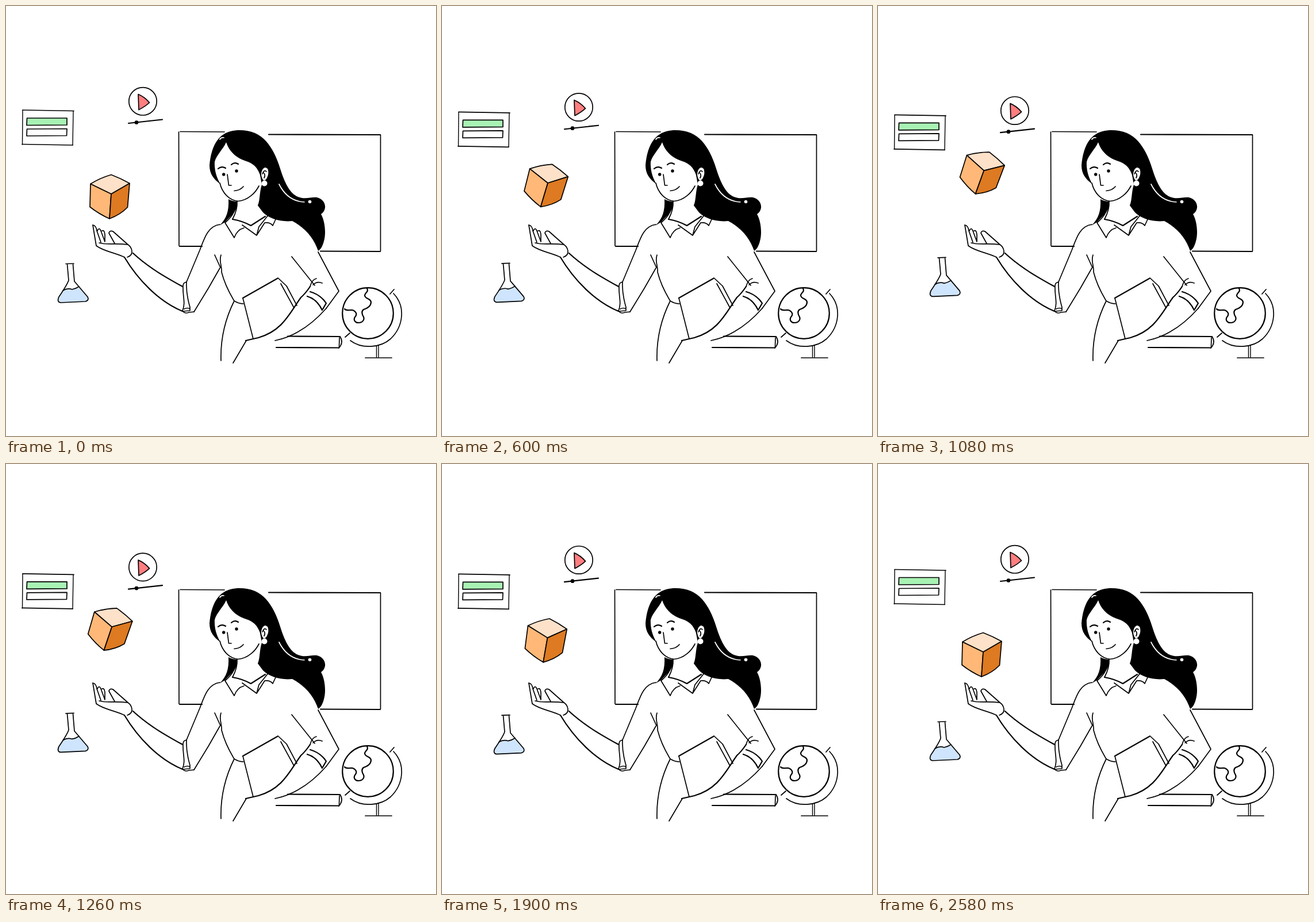
An HTML page for the animation above (2.6 s loop, 748x748 px).

```html
<!DOCTYPE html>
<html lang="en">
<head>
<meta charset="utf-8">
<title>Teacher</title>
<style>
  html, body { margin: 0; width: 100%; height: 100%; overflow: hidden; background: #fff; }
  svg { display: block; width: 100vw; height: 100vh; }
  .ink { fill: none; stroke: #000; stroke-width: 1.7; stroke-linecap: round; stroke-linejoin: round; }
  .bold { stroke-width: 2.2; }
  .thin { stroke-width: 1.4; }
  .black { fill: #000; }
  .glint { stroke: #fff; }
</style>
</head>
<body>
<svg viewBox="0 0 748 748">
  <!-- board -->
  <g class="ink">
    <path d="M303 218.500L380 219M300.500 219L301 417M651.500 224V426"/>
    <path class="bold" d="M457 223.500L651 224M302 418L341 418M547 426.500L651 427"/>
  </g>

  <!-- desk book and globe -->
  <g class="ink">
    <path class="bold" d="M490 574.500L581 575M470 594L579 594.500"/>
    <path d="M581 575Q588 585 579 595M580 577L579.500 593"/>
    <circle class="bold" cx="629.500" cy="534.500" r="44.300"/>
    <path d="M674 500C696 523 691 558 669 579C651 595 619 597 599 582"/>
    <path d="M668 501L675 493M590 576L598 569M625 612H671"/>
    <path class="thin" d="M644.500 591V611M648 590V611"/>
    <path class="bold" d="M589 527C592 531 598 528 603 529C610 532 611 537 607 541C604 546 607 551 613 551C620 551 624 546 622 541C619 536 618 531 622 528C628 526 635 522 635 515C634 508 624 510 624 503C625 498 631 498 628 491"/>
  </g>

  <!-- hair -->
  <path class="black" d="M383 237C378 249 366 259 363 271C362 288 368 301 373 310C361 301 354 292 354 277C356 252 364 232 379 223C392 214 416 214 433 221C456 231 469 257 477 283C484 305 493 326 508 332C520 337 530 332 541 333C550 335 556 343 555 351C554 357 551 360 548 362C555 374 557 396 553 409C551 417 548 423 543 426C536 405 521 386 498 374C477 376 458 370 447 359L438 347C442 338 441 322 445 311L442 294C437 280 430 274 418 270C399 264 388 252 383 237Z"/>
  <path class="black" d="M387 336C388 356 384 370 371 382L381 376L397 359L402 350V340Q394 340 387 336Z"/>
  <path class="ink glint" d="M372 232Q374 228 379 229M475 310C484 328 498 340 519 341"/>
  <circle cx="528.500" cy="340.500" r="2.800" fill="#fff"/>

  <!-- face -->
  <g class="ink">
    <path d="M372 308C376 325 388 338 404 339.500C421 338 434 325 440 313"/>
    <path class="bold" d="M369 283Q375 278 382 282M392 276Q398 271 404 275"/>
    <path d="M385 293L387.500 312L392 312M397 321.500Q407 321 413 314"/>
    <path fill="#fff" d="M443 293C444 281 451 277 456 283C459 291 456 300 451 304Q445 306 443 293Z"/>
    <path d="M446 292Q449 284 453 288M448 290Q452 294 449 299"/>
    <circle cx="449.500" cy="308.500" r="5" fill="#fff" stroke="none"/>
  </g>
  <circle class="black" cx="378.700" cy="293" r="2.700"/>
  <circle class="black" cx="401" cy="287" r="2.700"/>

  <!-- shirt -->
  <g class="ink">
    <path d="M402 340Q403 354 394 371M396 359C393 366 387 372 381 377L397 403Q402 389 414 386"/>
    <path class="bold" d="M394 371C406 373 417 377 426 382L451 366"/>
    <path d="M411 381L436 399L440 384M436 399L450 377Q460 376 464 382L470 369M440 384L456 364"/>
    <path d="M372 380C351 383 345 404 337 425L314 480M363 433L373 455M374 433C370 445 376 452 375 463C380 482 389 500 397 513"/>
    <path d="M372 456L352 491L327 532M397 513Q405 518 413 518M397 513C378 551 373 585 374 617"/>
    <path d="M314 480Q308 481 308 487C307 505 313 516 307 530Q311 536 318 533L327 532M314 480Q313 500 320 524V530L308 531M310 527Q316 524 320 527"/>
    <path d="M543 428L579 496L557 526M497 436L537 486M529 488Q532 476 540 474M534 485Q541 478 550 482"/>
    <path class="bold" d="M529 497Q547 502 557 517L550 529M524 505Q541 510 550 529"/>
  </g>

  <!-- hands and held book -->
  <g class="ink">
    <path class="bold" d="M221 430C249 456 280 473 307 488M206 437C230 477 266 514 307 531"/>
    <path d="M151 381L157 417C170 427 190 429 206 437M211 437Q220 434 219 426Q218 419 212 415L186 392Q180 390 179 395L189 413"/>
    <path d="M151 381Q157 382 158 391L165 411M159 391Q162 384 165 391L172 410M167 391Q171 389 172 397V409M162 412C175 416 190 412 212 415"/>
    <path class="bold" d="M412 508L472 474"/>
    <path d="M412 508L430 579M473 473L488 487L506 521M478 483L501 525"/>
    <path class="bold" d="M417 582L439 577C481 565 493 535 513 507Q521 500 529 488"/>
    <path d="M395 621L418 582M468 582C506 574 535 551 557 526"/>
  </g>

  <g id="card" class="ink">
    <path class="thin" d="M29 181L28.500 241M117 183L116 242"/>
    <path d="M29 181L118 182.500M28 240.500L116 242"/>
    <path fill="#a8f2b4" d="M36.500 195L106 195V207L36 207.500Z"/>
    <path d="M36.500 214L106 213.500L105.500 225.500L36 226Z"/>
  </g>

  <g id="play" class="ink">
    <circle cx="238" cy="165.800" r="24.200"/>
    <path fill="#ff7e80" d="M230 153.500Q241 158 249.500 168Q242 175 231 180.500Z"/>
    <path class="bold" d="M213 204L272 197.500"/>
    <circle class="black" cx="227" cy="202.500" r="2.500"/>
  </g>

  <g id="flask" class="ink">
    <path fill="#cfe4fd" stroke="none" d="M99 495Q107 490 115 493Q121 492 127 488L142 506Q145 512 138 514L95 516Q88 514 92 506Z"/>
    <path d="M104 448.500L118 448M106.500 449L109 477Q107 484 92 506Q88 515 95 516L138 514Q145 512 142 506L119 479L116.500 449"/>
    <path d="M99 495Q107 490 115 493Q121 492 127 488"/>
  </g>

  <g id="cube" class="ink">
    <path fill="#fee1c9" d="M147 309.500Q164 299 183 293.500Q200 300 215 308.500L183 327Z"/>
    <path fill="#ffb877" d="M147 309.500L183 327L180 370Q162 362 146 349.500Z"/>
    <path fill="#dd7a22" d="M215 308.500L183 327L180 370Q199 363 211.500 350Z"/>
  </g>
</svg>
<script>
  const LOOP = 2600;
  const $ = id => document.getElementById(id);
  const card = $('card'), play = $('play'), flask = $('flask'), cube = $('cube');

  const ease = x => (1 - Math.cos(Math.PI * Math.min(1, Math.max(0, x)))) / 2;
  // Rises from start to peak, then settles back by end
  const swell = (t, start, peak, end) =>
    t < peak ? ease((t - start) / (peak - start)) : ease((end - t) / (end - peak));
  const move = (el, y, turn = '') => el.setAttribute('transform', `translate(0 ${y.toFixed(2)}) ${turn}`);

  function draw(t) {
    move(card, 11.4 * swell(t, 0, 1650, 3000));
    move(play, 17 * swell(t, 200, 910, 2100));
    move(flask, -17 * swell(t, 470, 1520, 2490));
    const angle = 16.5 * swell(t, 0, 890, 2600);
    move(cube, -44.6 * swell(t, 0, 1300, 2600), `rotate(${angle.toFixed(2)} 180.5 332)`);
  }

  const begin = performance.now();
  function tick() {
    draw((performance.now() - begin) % LOOP);
    requestAnimationFrame(tick);
  }
  draw(0);
  requestAnimationFrame(tick);
</script>
</body>
</html>
```
